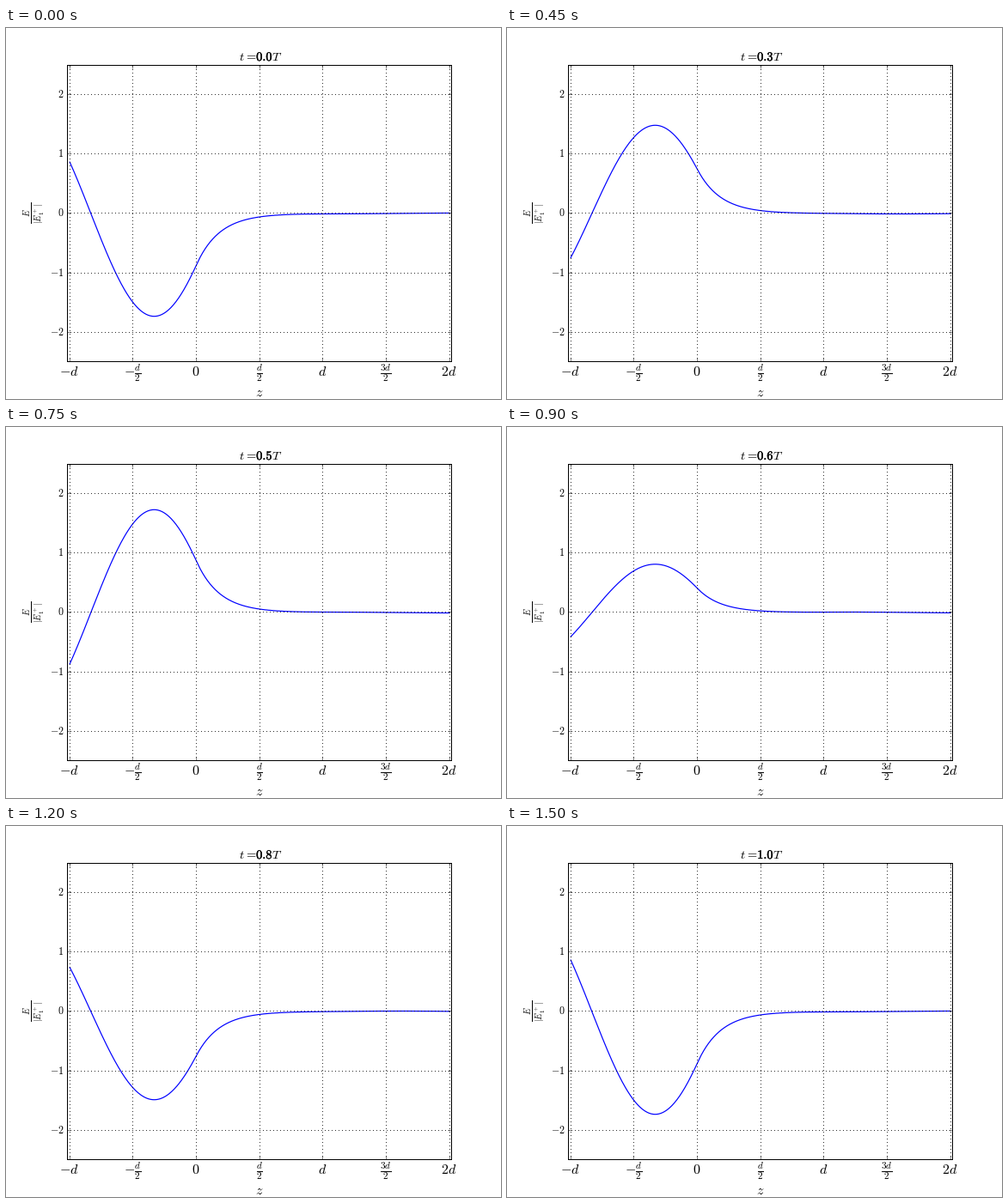
A matplotlib script that plays this animation: 576 px wide and 432 px high, repeating every 1650 ms.

```python
import numpy as np
import matplotlib.pyplot as plt
from matplotlib.animation import FuncAnimation
from matplotlib.patheffects import withStroke
from matplotlib.transforms import Affine2D

plt.style.use("classic")
plt.rcParams.update({
    "figure.facecolor": "white",
    "savefig.facecolor": "white",
    "savefig.dpi": "figure",
    "mathtext.fontset": "cm",
})

WIDTH, HEIGHT, DPI = 576, 432, 72
FRAMES, INTERVAL = 11, 150

# Moving the axes left and up makes frame and grid snap to the lower pixel.
SNAP = 0.55

# Lengths are in units of the barrier thickness d.
K = np.pi
KAPPA = np.sqrt(3) * K
PHASE = np.radians(150)


def tunnelling_field(z):
    """Complex field of a wave hitting a barrier that fills 0 < z < 1."""
    slope = 1j * K / KAPPA
    # Transmitted amplitude is 1 first, then rescaled to a unit incident wave.
    decay = (1 + slope) / 2 * np.exp(KAPPA)
    growth = (1 - slope) / 2 * np.exp(-KAPPA)
    value = decay + growth
    current = (decay - growth) / slope
    incident, reflected = (value + current) / 2, (value - current) / 2
    field = np.where(
        z < 0,
        incident * np.exp(-1j * K * z) + reflected * np.exp(1j * K * z),
        np.where(
            z < 1,
            decay * np.exp(-KAPPA * z) + growth * np.exp(KAPPA * z),
            np.exp(-1j * K * (z - 1)),
        ),
    )
    return field / incident * np.exp(1j * PHASE)


fig = plt.figure(figsize=(WIDTH / DPI, HEIGHT / DPI), dpi=DPI)
ax = fig.add_axes([0.125 - SNAP / WIDTH, 0.1 + SNAP / HEIGHT, 0.775, 0.8])
ax.set_xlim(-1.015, 2.015)
ax.set_ylim(-2.5, 2.5)
ax.set_xticks(np.arange(-1, 2.1, 0.5))
ax.set_yticks(range(-2, 3))
ax.tick_params(labelbottom=False, labelleft=False)
ax.grid(True, linewidth=0.8, linestyle=(0.5, (1, 3)))


def label(x, y, text, size, **options):
    """Place text at a pixel position measured from the top left."""
    options = {"ha": "center", "va": "baseline", **options}
    return fig.text(x / WIDTH, 1 - y / HEIGHT, text, fontsize=size, **options)


def to_pixels(x, y):
    px, py = ax.transData.transform((x, y))
    return px, HEIGHT - py


X_LABELS = ["-d", r"-\frac{d}{2}", "0", r"\frac{d}{2}", "d",
            r"\frac{3d}{2}", "2d"]
for tick, text in zip(ax.get_xticks(), X_LABELS):
    label(to_pixels(tick, 0)[0], 405.2, f"${text}$", 16)
for tick in range(-2, 3):
    label(67.6, to_pixels(0, tick)[1] + 4, f"${tick}$", 12, ha="right")

label(295, 429, "$z$", 16)
label(33, 215.5, r"$\frac{E}{|E_1^+|}$", 14.5, rotation=90, va="center")

label(271, 38, r"$t\hspace{0.08}=$", 14.4, ha="left")
clock = label(301, 38, "", 14.4,
              path_effects=[withStroke(linewidth=0.4, foreground="black")])
label(321.5, 38, "$T$", 14.4, ha="right")

z = np.linspace(-1, 2, 601)
field = tunnelling_field(z)
curve, = ax.plot(z, field.real, color="blue", linewidth=1.2,
                 transform=ax.transData + Affine2D().translate(SNAP, -SNAP))


def update(frame):
    t = frame / 10
    curve.set_ydata((field * np.exp(2j * np.pi * t)).real)
    clock.set_text(rf"$\mathbf{{{t:.1f}}}$")
    return curve, clock


animation = FuncAnimation(fig, update, frames=FRAMES, interval=INTERVAL,
                          repeat=True, repeat_delay=0)
plt.show()
```
